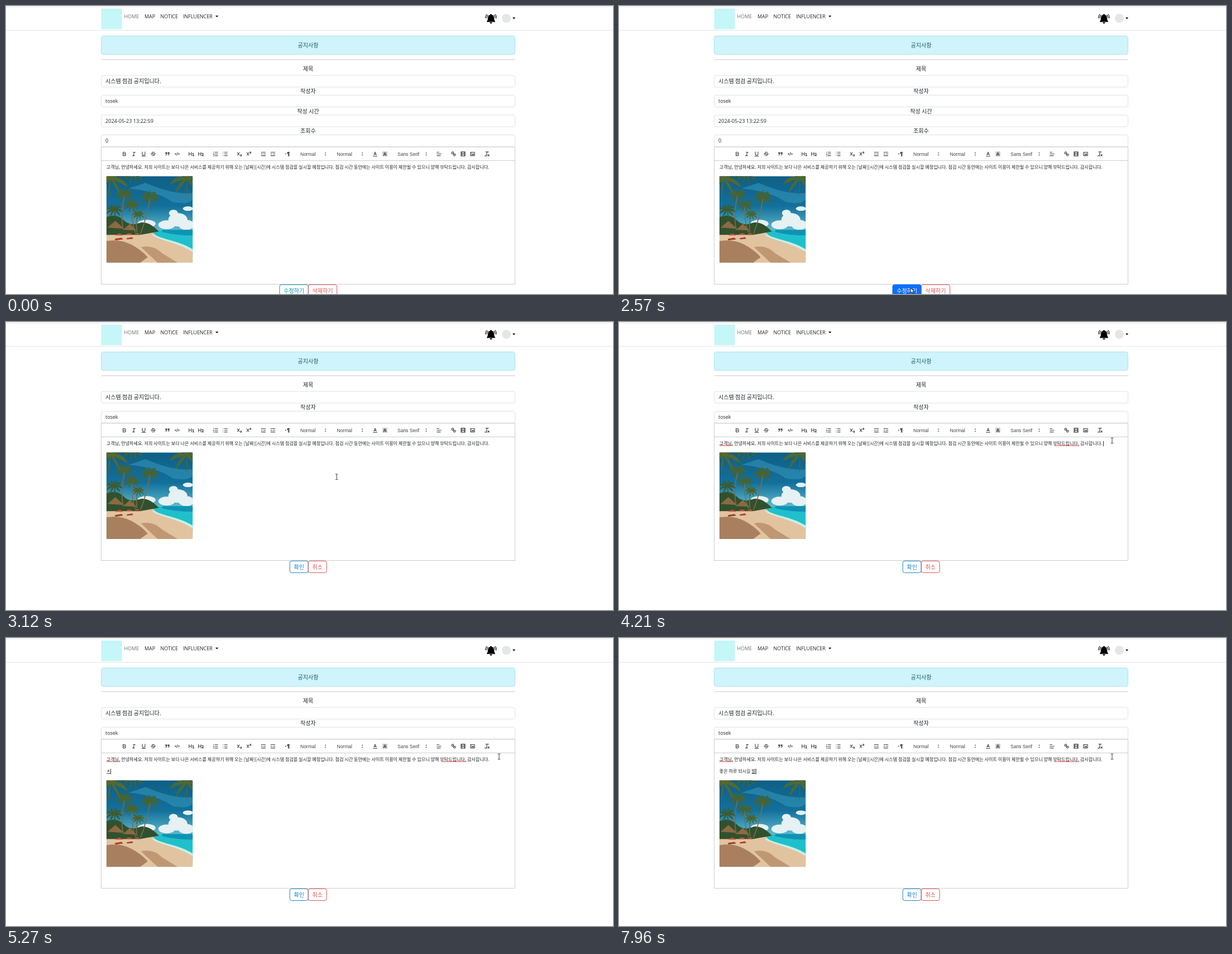
Animation, 1087 px wide and 515 px high, one loop 8 s. Source, as an HTML page:

```html
<!DOCTYPE html>
<html>
<head>
<meta charset="utf-8">
<title>공지사항</title>
<style>
html, body { margin: 0; width: 100%; height: 100%; overflow: hidden; background: #fff; }
svg { display: block; width: 100%; height: 100%; }
text { white-space: pre; fill: #212529; }
.ko { font-family: "Noto Sans CJK KR", "Noto Sans KR", "Noto Sans CJK JP", sans-serif; }
.en { font-family: "Open Sans", "Noto Sans", sans-serif; }
.ui { font-family: "Liberation Sans", Arial, sans-serif; }
.mid { text-anchor: middle; }
.box { fill: #fff; stroke: #dee2e6; }
.frame { fill: none; stroke: #ccc; }
.line { fill: none; stroke: #444; stroke-width: 1.8; stroke-linecap: round; stroke-linejoin: round; }
.solid { fill: #444; }
</style>
</head>
<body>
<svg id="stage" viewBox="0 0 1087 515"></svg>
<script>
const LOOP = 8000, LINE = 10.55;
const SWAP = 2640, FOCUS = 3880, ENTERS = [4940, 5070];

const text = (x, y, s, size, cls = 'ko', more = '') =>
  `<text x="${x}" y="${y + size * (cls.includes('ko') ? .38 : .36)}" font-size="${size}" class="${cls}" ${more}>${s}</text>`;
const rect = (x, y, w, h, more = '') => `<rect x="${x}" y="${y}" width="${w}" height="${h}" ${more}/>`;
const path = (d, more = '') => `<path d="${d}" ${more}/>`;
const ellipse = (x, y, rx, ry, fill) => `<ellipse cx="${x}" cy="${y}" rx="${rx}" ry="${ry}" fill="${fill}"/>`;
const group = (id, body, more = '') => `<g id="${id}" ${more}>${body}</g>`;

const label = (y, s) => text(541, y, s, 10.07, 'ko mid');
const field = (y, s, size, cls) =>
  rect(170.5, y, 741, 21, 'rx="3.5" class="box"') + text(178, y + 10.6, s, size, cls);
const button = (x, w, s, color, id = '') =>
  `<g id="${id}">` + rect(x, 498.3, w, 21, `rx="3.5" fill="none" stroke="${color}"`) +
  text(x + w / 2, 508.8, s, 10.07, 'ko mid', `style="fill:${color}"`) + '</g>';

// Toolbar icons on an 18-unit grid: centre x, stroked path, filled path
const H = 'M2 4V14M9 4V14M2 9H9', BARS = 'M7 4H15M7 9H15M7 14H15';
const X = 'M3 5L9 13M9 5L3 13', TWO = 'q2-2 3 0q0 1-3 3h3';
const icons = [
  [212, 'M5 4H9.5a2.5 2.5 0 0 1 0 5H5ZM5 9h5.5a2.5 2.5 0 0 1 0 5H5Z'],
  [229, 'M7 4H13M5 14H11M8 14L10 4'],
  [246.5, 'M5 3V9a4 4 0 0 0 8 0V3M3.5 15.5H14.5'],
  [263.5, 'M12.5 5.5C11 3 5.5 3.5 5.5 6.5S12.5 9 12.5 12S6 15 5 12.5M2.5 9.3L15.5 8.7'],
  [289, 'M7 8q0 4-3 5M14 8q0 4-3 5', 'M3 4h5v5h-5ZM10 4h5v5h-5Z'],
  [306.5, 'M5 7L3 9L5 11M13 7L15 9L13 11M10 5L8 13'],
  [332, H + 'M12.5 8.5L14.5 7V14M12.5 14H16.5'],
  [349, H + 'M12 8.5C12.5 6.5 16 6.5 16 9S12 13 12 14H16.5'],
  [375.5, BARS, 'M2.5 2.5h1.2v4h-1.2ZM2 8h2.5v1l-1.3 1.5h1.3v1h-2.5ZM2 12.5h2.5v4h-2.5v-1h1.5v-2h-1.5Z'],
  [392.5, BARS + 'M3 4h.1M3 9h.1M3 14h.1'],
  [418, X + 'M12 12' + TWO],
  [435, X + 'M12 4' + TWO],
  [461, 'M3 4H15M9 9H15M3 14H15', 'M5.5 6.5V11.5L2.5 9Z'],
  [478, 'M3 4H15M9 9H15M3 14H15', 'M3 6.5V11.5L6 9Z'],
  [504, 'M15 4H11M11.5 4V15M13.8 4V15', 'M3 6.5V11.5L6 9ZM11 3a3 3 0 0 0 0 6h1V3Z'],
  [572, '', 'M6.5 11h5L9 14ZM6.5 7h5L9 4Z'],
  [638, '', 'M6.5 11h5L9 14ZM6.5 7h5L9 4Z'],
  [661, 'M5.5 12L9 3.5L12.5 12M6.5 10H11.5M3.5 15.5H14.5'],
  [678.5, 'M5.5 13.5L9 5L12.5 13.5M6.5 11H11.5'],
  [752.5, '', 'M6.5 11h5L9 14ZM6.5 7h5L9 4Z'],
  [775.5, 'M3 9H15M3 14H13M3 4H9'],
  [801.5, 'M7 7L11 11M8.9 4.6a3.5 3.5 0 0 1-4.3 4.3C3 7.5 2 6.4 4.2 4.2S7.5 3.2 8.9 4.6ZM13.4 9.1a3.5 3.5 0 0 0-4.3 4.3c1.4 1.4 2.5 2.5 4.7.4S14.8 10.5 13.4 9.1Z'],
  [818.5, 'M3 3H15V15H3ZM6 3V15M12 3V15M6 9H12M3 7H6M3 11H6M12 7H15M12 11H15'],
  [835.5, 'M3 4H15V14H3Z', 'M5 12V11L7 9L8 10L11 7L13 9V12ZM5 6h2v2h-2Z'],
  [861.5, 'M5 3H13M9 3L7 13M2.5 14.5H8M11 11L15 15M15 11L11 15'],
];
const icon = ([x, line, fill = '']) =>
  `<g transform="translate(${x - 5.5} 259) scale(.613)">` +
  (x == 678.5 ? rect(2, 2, 14, 14, 'fill="#c4c4c4"') : '') +
  path(fill, 'class="solid"') + path(line, 'class="line"') + '</g>';
const picker = (x, s) => text(x, 264.5, s, 8.5, 'ui', 'style="fill:#444"');

// Palm crown: leaves fanned around a point
function palm(x, y, r, color = '#49632f') {
  let d = '';
  for (let i = 0; i < 9; i++) {
    const a = i * 2 * Math.PI / 9 + x, c = Math.cos(a) * r, s = Math.sin(a) * r;
    d += `M${x} ${y}Q${x + c * .6} ${y + s * .6 - r * .35} ${x + c} ${y + s * .8 + r * .2}Q${x + c * .4} ${y + s * .5} ${x} ${y}`;
  }
  return path(d, `fill="${color}" stroke="${color}" stroke-width="1.3"`);
}
const trunk = d => path(d, 'fill="none" stroke="#7d6a4c" stroke-width="1.6"');

const photo = `<g transform="translate(179.8 304.3)" clip-path="url(#crop)">` +
  rect(0, 0, 155, 155, 'fill="url(#sky)"') +
  path('M40 22Q95 28 118 46Q150 52 155 40V30Q120 34 70 12Z', 'fill="#3a9cc0" opacity=".5"') +
  [[128, 78, 17, 12], [108, 87, 15, 8], [143, 87, 14, 9], [146, 58, 9, 4], [72, 85, 16, 7], [120, 66, 8, 6]]
    .map(c => ellipse(...c, '#e5f1f3')).join('') +
  path('M80 97H155V142Q112 126 80 108Z', 'fill="#1fc0cb"') +
  path('M100 96H155V106Q125 106 100 100Z', 'fill="#0f93b4"') +
  path('M0 103Q50 96 84 101C90 112 125 114 155 134V155H0Z', 'fill="#e2c3a0"') +
  path('M84 103C92 112 128 114 155 131V136C125 117 90 114 82 105Z', 'fill="#c9eee6"') +
  path('M0 116Q25 112 44 122T74 145L60 155H0Z', 'fill="#a9805f"') +
  path('M62 127Q84 122 100 138L128 155H92Z', 'fill="#bf9873"') +
  path('M0 73Q18 66 30 78T58 84T94 99L60 105H0Z', 'fill="#31512d"') +
  path('M2 92L16 80L32 94ZM30 96L42 85L54 97Z', 'fill="#8c6a43"') +
  trunk('M46 55Q44 80 52 101') + trunk('M78 40Q72 75 61 103') + trunk('M33 34Q24 65 30 96') + trunk('M56 70Q52 85 55 100') +
  palm(78, 37, 16) + palm(46, 51, 13) + palm(32, 32, 15) + palm(57, 68, 10) + palm(14, 60, 14, '#3d5b30') +
  palm(8, 4, 31, '#54692f') + palm(144, 4, 30, '#4d6834') + palm(48, -4, 18, '#44622f') +
  path('M16 106q7-7 14 0ZM34 105q7-6 13 0ZM50 104q5-5 10 0Z', 'fill="#c9503a"') +
  path('M15 112l12-2 3 3-14 2ZM36 111l10-2 2 3-11 1Z', 'fill="#a4402f"') + '</g>';

function squiggle(x, end) {
  let d = `M${x} 291`;
  for (let up = 0; x < end; up ^= 1) d += `L${x += 1.5} ${up ? 291 : 293}`;
  return path(d, 'fill="none" stroke="#e0383a" stroke-width=".9"');
}

const message = '고객님, 안녕하세요. 저희 사이트는 보다 나은 서비스를 제공하기 위해 오는 [날짜][시간]에 시스템 점검을 실시할 예정입니다. 점검 시간 동안에는 사이트 이용이 제한될 수 있으니 양해 부탁드립니다. 감사합니다.';

const nav = rect(0, 1, 1087, 1, 'fill="#e2e2e2"') + rect(0, 43, 1087, 1, 'fill="#e4e4e4"') +
  rect(170.5, 4.5, 37, 37, 'fill="#c5f6f8"') +
  text(211.5, 18.6, 'HOME', 8.95, 'en', 'style="fill:#6b7573"') +
  text(248, 18.6, 'MAP', 8.95, 'en') + text(276.5, 18.6, 'NOTICE', 8.95, 'en') + text(317, 18.6, 'INFLUENCER', 8.95, 'en') +
  path('M375 17.2h5.4l-2.7 2.9ZM907 20.6h5.2l-2.6 2.8Z') +
  path('M868.5 14.2q1.2 0 1.3 1.4q4.1 1 4.2 6q0 4.3 2 6.2v.8h-15v-.8q2-1.9 2-6.2q.1-5 4.2-6q.1-1.4 1.3-1.4ZM866.3 29.3h4.4q-.4 2.3-2.2 2.3t-2.2-2.3Z') +
  path('M863.2 15.8q-2.2 2.5-2.2 6M861 14.5q-2.5 3-2.2 7.5M873.8 15.8q2.2 2.5 2.2 6M876 14.5q2.5 3 2.2 7.5', 'fill="none" stroke="#000" stroke-width="1.1"') +
  ellipse(896, 22, 8, 8, '#e4e7e7');

stage.innerHTML = `<defs>
  <linearGradient id="sky" x2="0" y2="1"><stop stop-color="#0f5f86"/><stop offset=".35" stop-color="#12709c"/><stop offset=".62" stop-color="#5fb8cb"/></linearGradient>
  <clipPath id="crop">${rect(0, 0, 154.4, 154.8)}</clipPath></defs>` +
  nav +
  rect(170.5, 53.5, 741, 33, 'rx="3.5" fill="#cff4fc" stroke="#aee3ee"') +
  text(541, 70, '공지사항', 10.07, 'ko mid', 'style="fill:#1f5f6b"') +
  rect(170.5, 95.5, 741.5, 1, 'fill="#c9c9c9"') +
  label(112.3, '제목') + field(124, '시스템 점검 공지입니다.', 10.07, 'ko') +
  label(152.3, '작성자') + field(159.5, 'tosek', 8.95, 'en') +
  group('details',
    label(187.8, '작성 시간') + field(195, '2024-05-23 13:22:59', 9.1, 'en') +
    label(223.3, '조회수') + field(230.5, '0', 9.1, 'en')) +
  group('panel',
    rect(170.5, 252, 741, 24.5, 'class="frame"') + icons.map(icon).join('') +
    picker(527, 'Normal') + picker(592.5, 'Normal') + picker(701, 'Sans Serif') +
    rect(170.5, 276.5, 741, 221, 'id="page" class="frame"') +
    text(179.8, 287.8, message, 8.11) +
    group('errors', squiggle(180, 203) + squiggle(779.5, 824.5)) +
    text(179.8, 309, '', 8.11, 'ko', 'id="typed"') +
    rect(0, 313, 7.4, .8, 'id="under" fill="#222"') +
    rect(0, 0, .8, 9.5, 'id="caret"') +
    group('lower', photo +
      group('viewButtons', button(490, 51.3, '수정하기', '#108fb4', 'modify') + button(541.3, 51.3, '삭제하기', '#d9534f')) +
      group('editButtons', button(508.2, 33, '확인', '#1784c7') + button(541.2, 33, '취소', '#d9534f')))) +
  group('cursor',
    path('M0 0V9.2L2.2 7.2L3.7 10.6L5.2 9.9L3.7 6.7H6.6Z', 'id="arrow" fill="#fff" stroke="#000" stroke-width=".8"') +
    path('M-2.3-4.8H-.6L0-4.3L.6-4.8H2.3M0-4.3V4.3M-2.3 4.8H-.6L0 4.3L.6 4.8H2.3', 'id="beam" fill="none" stroke="#222" stroke-width=".9"') +
    path('M-.9 .8Q0-.5 .9 .8V4.2Q2 3.6 2.6 4.6Q3.8 4 4.3 5Q6 4.6 6.1 6V8.6L5.2 11.5H-.6L-3.4 7.4Q-3.2 6-1.8 6.7L-.9 7.6Z', 'id="hand" fill="#fff" stroke="#000" stroke-width=".8"'));

// Keystrokes: time, committed text, syllable being composed
const keys = [
  [5270, '', 'ㅈ'], [5600, '', '조'], [5800, '', '좋'],
  [6130, '좋', 'ㅇ'], [6200, '좋', '으'], [6340, '좋은', ''], [6410, '좋은 ', ''],
  [6480, '좋은 ', 'ㅎ'], [6550, '좋은 ', '하'], [6610, '좋은 ', '할'], [6740, '좋은 하', '루'],
  [6890, '좋은 하루 ', 'ㄷ'], [7090, '좋은 하루 ', '도'], [7160, '좋은 하루 ', '되'], [7230, '좋은 하루 ', '됫'],
  [7300, '좋은 하루 되', '시'], [7430, '좋은 하루 되', '식'], [7500, '좋은 하루 되시', '기'], [7570, '좋은 하루 되시', '길'],
  [7690, '좋은 하루 되시길 ', ''], [7820, '좋은 하루 되시길 ', 'ㅂ'], [7890, '좋은 하루 되시길 ', '바'], [7960, '좋은 하루 되시길 ', '발'],
];

// Pointer route: time, x, y
const route = [
  [180, 1050, 332], [600, 760, 450], [810, 600, 503], [950, 522, 488], [1030, 522, 504],
  [SWAP, 522, 504], [3120, 592, 277], [3260, 616, 259], [3920, 872, 211], [4070, 872, 211], [4210, 883, 212],
];
function pointer(t) {
  const i = route.findIndex(p => p[0] > t);
  if (i < 1) return route.at(i).slice(1);
  const [t0, x0, y0] = route[i - 1], [t1, x1, y1] = route[i], k = (t - t0) / (t1 - t0);
  return [x0 + (x1 - x0) * k, y0 + (y1 - y0) * k];
}

const $ = id => document.getElementById(id);
const set = (id, attrs) => { for (const a in attrs) $(id).setAttribute(a, attrs[a]); };
const show = (id, on) => { $(id).style.display = on ? '' : 'none'; };

function draw(t) {
  const edit = t >= SWAP, lines = ENTERS.filter(e => t >= e).length, grow = lines * LINE;
  show('details', !edit);
  show('viewButtons', !edit);
  show('editButtons', edit);
  show('errors', t >= FOCUS);
  set('panel', { transform: `translate(0 ${edit ? -71 : 0})` });
  set('page', { height: 221 + grow });
  set('lower', { transform: `translate(0 ${grow})` });

  const glow = Math.min(1, Math.max(0, (t - 1030) / 150));
  const [face, word] = $('modify').children;
  face.style.fill = `rgb(13 110 253 / ${glow})`;
  face.style.stroke = glow ? '#0d6efd' : '#108fb4';
  word.style.fill = `color-mix(in srgb, #fff ${glow * 100}%, #108fb4)`;

  const [, done, open] = keys.findLast(k => t >= k[0]) || [0, '', ''];
  $('typed').textContent = done + open;
  const end = 179.8 + (done + open ? $('typed').getComputedTextLength() : 0);
  show('under', open);
  set('under', { x: end - 7.4 });
  const last = [FOCUS, ...ENTERS, ...keys.map(k => k[0])].findLast(k => t >= k);
  show('caret', t >= FOCUS && (t - last) % 1060 < 530);
  set('caret', { x: lines ? end : 867, y: 283.8 + grow });

  const [x, y] = pointer(t);
  const top = edit ? 205 : 276, bottom = edit ? 427 + grow : 498;
  const beam = x < 912 && y > top && y < bottom;
  const hand = !beam && t >= 1000 && t < 2500;
  show('cursor', t >= 180);
  show('beam', beam);
  show('hand', hand);
  show('arrow', !beam && !hand);
  set('cursor', { transform: `translate(${x} ${y})` });
}

function tick() {
  draw(performance.now() % LOOP);
  requestAnimationFrame(tick);
}
tick();
</script>
</body>
</html>
```
